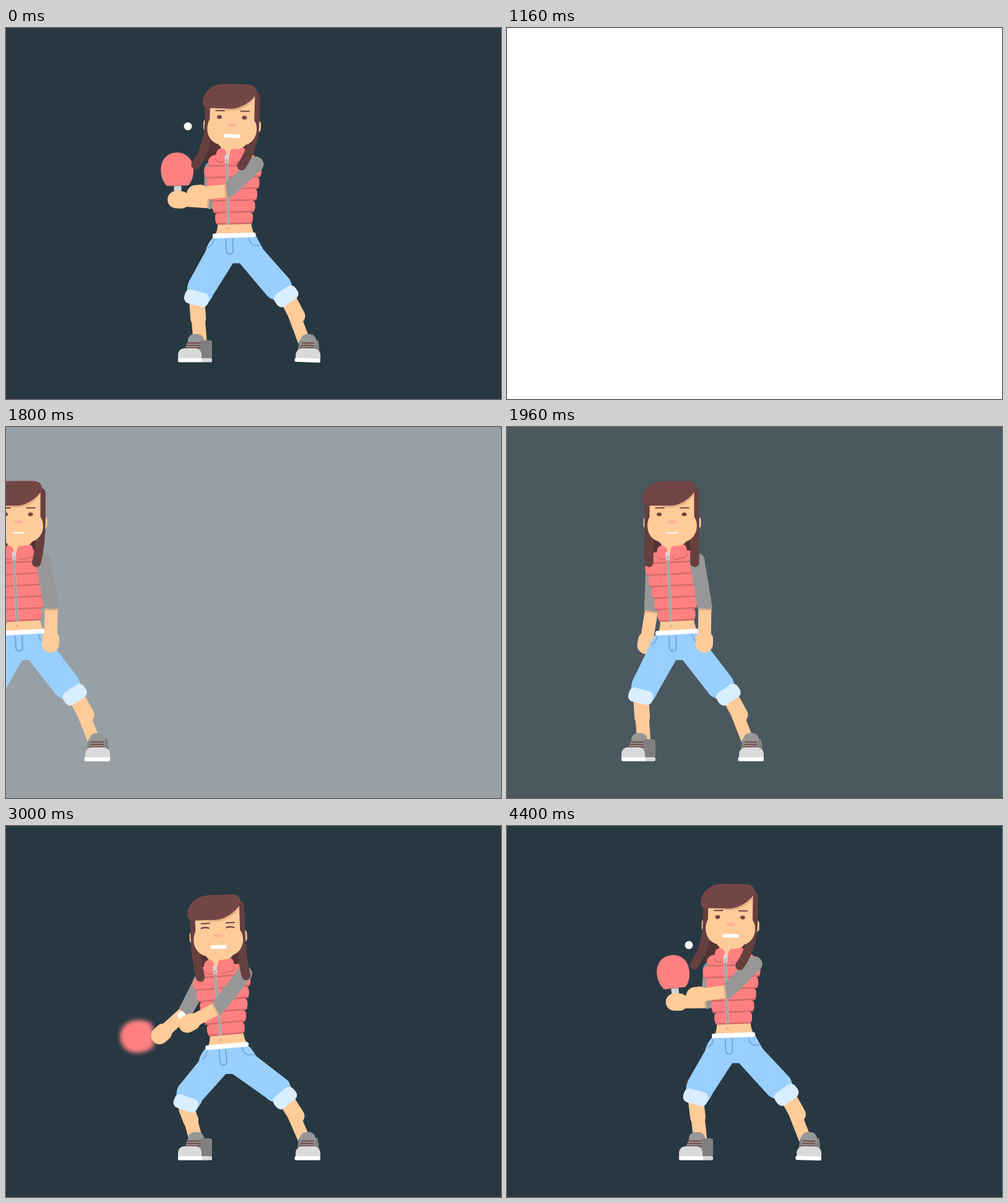
An HTML page with a canvas that plays this animation: 800x600 px, repeating every 4.44 s.

```html
<!DOCTYPE html>
<html>
<head>
<meta charset="utf-8">
<style>
html, body { margin: 0; width: 100%; height: 100%; overflow: hidden; background: #283842; }
canvas { display: block; }
</style>
</head>
<body>
<canvas id="stage" width="800" height="600"></canvas>
<script>
const ctx = document.getElementById('stage').getContext('2d');
// The loop is told from the white screen on: walk in, crouch, toss, strike, white.
const LOOP = 4440, START = 1600, WHITE = 5600, HIT = 4800, RELEASE = 4335;
const SKIN = '#ffcb99', SKIN_DARK = '#e6b286', CORAL = '#ff8080', SEAM = '#d66b6d';
const HAIR = '#734646', STRAND = '#663f3f', BACK_HAIR = '#553333';
const GREY = '#979797', DARK_GREY = '#808080', LIGHT = '#dadada', BLUE_LINE = '#74aedf';

// waist x, y, tilt; racket arm: elbow, hand, racket angle; ball arm: elbow, hand
const STAND = [368, 332, -3, 327, 294, 318, 350, -180, 413, 290, 412, 348];
const CROUCH = [350, 356, -5, 291, 300, 247, 326, -32, 343, 294, 292, 312];
const TOSS = [373, 331, -.7, 341, 277, 285, 267, 5, 364, 256, 313, 258];
const FOLLOW = [386, 346, 2, 397, 285, 456, 269, 82, 433, 285, 426, 338];

const clamp = v => Math.max(0, Math.min(1, v));
const mix = (a, b, k) => a + (b - a) * k;
const ramp = (t, from, to) => clamp((t - from) / (to - from));
const ease = (t, from, to) => {
  const u = ramp(t, from, to);
  return u * u * (3 - 2 * u);
};
const bump = (t, mid, half) => clamp(1 - Math.abs(t - mid) / half);

function poseAt(t) {
  const crouch = ease(t, 2480, 2960);
  let p = STAND;
  for (const [next, k] of [[CROUCH, crouch], [TOSS, ease(t, 4120, 4560)], [FOLLOW, ease(t, 4760, 5000)]])
    p = p.map((v, i) => mix(v, next[i], k));
  let [x, y, tilt, ex, ey, hx, hy, angle, bex, bey, bhx, bhy] = p;

  // The weight shifts sideways later than the knees bend.
  const lag = 18 * (crouch - ease(t, 2480, 3400));
  // Two dips of the racket while she bounces on her knees.
  const dip = Math.sin(Math.PI * 2 * ramp(t, 2694, 3918)) ** 2;
  const bob = Math.sin(Math.PI * 2 * ramp(t, 3000, 3920));
  return {
    x: x + lag, y: y - 5 * bob, tilt,
    racketArm: [ex, ey, hx + lag / 2, hy + 11 * dip],
    ballArm: [bex, bey, bhx + lag / 2, bhy + 7 * dip],
    angle: angle - 63 * dip
  };
}

function at(x, y, deg, draw) {
  ctx.save();
  ctx.translate(x, y);
  ctx.rotate(deg * Math.PI / 180);
  draw();
  ctx.restore();
}
function fill(color, d) {
  ctx.fillStyle = color;
  ctx.fill(new Path2D(d));
}
function line(color, width, d, cap = 'round') {
  ctx.strokeStyle = color;
  ctx.lineWidth = width;
  ctx.lineCap = cap;
  ctx.lineJoin = 'round';
  ctx.stroke(new Path2D(d));
}
function box(color, x, y, w, h, r = 0) {
  ctx.fillStyle = color;
  ctx.beginPath();
  ctx.roundRect(x, y, w, h, r);
  ctx.fill();
}
function oval(color, x, y, rx, ry = rx) {
  ctx.fillStyle = color;
  ctx.beginPath();
  ctx.ellipse(x, y, rx, ry, 0, 0, 7);
  ctx.fill();
}

const weave = document.createElement('canvas');
weave.width = 4;
weave.height = 1;
const thread = weave.getContext('2d');
thread.fillStyle = '#9bd1ff';
thread.fillRect(0, 0, 4, 1);
thread.fillStyle = '#95cbfa';
thread.fillRect(0, 0, 1, 1);
const denim = ctx.createPattern(weave, 'repeat');

function laces(x, w) {
  for (let y = 509.5; y < 518; y += 4) line(HAIR, 2, `M${x - (y - 509) / 4} ${y}H${x + w}`);
}

function shoes(tilt) {
  box(GREY, 294, 495, 26, 28, 10);
  box(DARK_GREY, 314, 505, 19, 30, 4);
  fill(GREY, 'M293 508H315V522H288Z');
  laces(293, 21);
  box(LIGHT, 278, 518, 38, 18, [10, 10, 0, 0]);
  box('#fff', 278, 534, 39, 6.5, [2, 0, 0, 2]);
  box(LIGHT, 317, 534, 16, 6.5, [0, 2, 2, 0]);
  at(487, 537, tilt, () => {
    ctx.translate(-487, -537);
    fill(DARK_GREY, 'M475 504H502Q505 504 506 525H471Q472 504 475 504Z');
    box(GREY, 475, 495, 25, 26, 10);
    laces(478, 19);
    box(LIGHT, 468, 518, 40, 18, [11, 11, 0, 0]);
    box('#fff', 466.5, 534, 41.5, 6.5, 2);
  });
}

function legs(t, x, y, tilt) {
  // The feet stay put, so the knees follow the waist in part.
  const dx = x - STAND[0], dy = y - STAND[1];
  const lx = 309 + .67 * dx - .47 * dy, ly = 436 - .2 * dx + .46 * dy;
  const rx = 451 + .77 * dx + .345 * dy, ry = 433 - .1 * dx + .25 * dy;
  const L = (a, b) => `${lx + a} ${ly + b} `, R = (a, b) => `${rx + a} ${ry + b} `;
  const W = (a, b) => `${x + a} ${y + b} `;

  const ankle = 314 + .4 * (lx - 309);
  line(SKIN, 25, `M${L(1, 8)}L${mix(lx, ankle, .5)} ${mix(ly, 502, .5)}`);
  line(SKIN, 22, `M${mix(lx, ankle, .4)} ${mix(ly, 502, .4)}L${ankle} 506`);
  line(SKIN, 26, `M${R(5, 8)}L${mix(rx, 482, .5) + 3} ${mix(ry, 502, .47)}`);
  line(SKIN, 20, `M${mix(rx, 482, .45)} ${mix(ry, 502, .45)}L481 505`);
  shoes(2 * ramp(t, 4300, 4440));

  const hip = 25 + 1.8 * tilt;
  fill(denim,
    `M${W(-34, 3)}Q${W(-43, 12)}${W(-46, 25)}L${L(-12, -28)}Q${L(-16, -20)}${L(-15, -8)}` +
    `L${L(18, 8)}Q${L(23, 3)}${L(27, -6)}L${W(-2, 45)}${W(9, 45)}L${R(-31, -1)}` +
    `Q${R(-25, 6)}${R(-14, 7)}L${R(10, -10)}Q${R(10, -20)}${R(5, -28)}L${W(47, hip)}Q${W(40, hip - 12)}${W(35, 0)}Z`);
  at(lx, ly, 14 + dy * .25, () => box('#d9eeff', -20, -12, 40, 23, 9));
  at(rx, ry, -34 - dy * .25, () => box('#d9eeff', -20, -12, 40, 24, 9));
}

function torso() {
  line(BLUE_LINE, 2.5, 'M-13.500 5V23Q-13.500 30 -8 30Q-2.500 30 -2.500 23V5', 'butt');
  line(BLUE_LINE, 2, 'M-43 18Q-34 15 -33 5M24 4Q25 16 34 17H43', 'butt');
  fill(SKIN, 'M-26 -20H28Q29 -8 33 0H-31Q-27 -8 -26 -20Z');
  oval(SKIN_DARK, -9.5, -11, 2.5, 2);
  box('#fff', -35, -4, 70, 7.5, 3);
  box(SKIN, -18, -152, 24, 36);
  box(SKIN_DARK, -18, -152, 24, 14);
  for (let i = 0; i < 6; i++) {
    const y = -131 + 18.8 * i, half = i ? 50 - 4 * i : 39, top = i ? 5 : 14;
    box(SEAM, -half + 1, y + 5, 2 * half - 1, 14, 4);
    box(CORAL, -half, y, 2 * half + 1, 16.3, [top, top, 5, 5]);
  }
  fill(SKIN, 'M-15 -141H-1L-8 -118Z');
  for (const [x, w, turn] of [[-18, 16, 12], [10, 26, -12]]) {
    at(x, -130, turn, () => {
      box(SEAM, -w / 2, -9, w, 21, 7);
      box(CORAL, -w / 2, -11, w, 21, 7);
    });
  }
  line('#b3b3b3', 4.5, 'M-9 -125V-18', 'butt');
  line('#8d8d8d', 1, 'M-9 -125V-18', 'butt');
  box('#d4d4d4', -12, -131, 6.5, 13, 3);
  oval('#a5a5a5', -8.8, -122, 1.5, 2);
}

function arm([sx, sy], [ex, ey, hx, hy]) {
  const len = Math.hypot(hx - ex, hy - ey), ux = (hx - ex) / len, uy = (hy - ey) / len;
  const cx = ex + ux * 4, cy = ey + uy * 4;
  line(SKIN, 21, `M${ex} ${ey}L${hx} ${hy}`);
  at(hx, hy, Math.atan2(uy, ux) * 180 / Math.PI, () => box(SKIN, -19, -14, 36, 28, 14));
  line(SKIN_DARK, 21, `M${cx} ${cy}L${cx + ux * 3} ${cy + uy * 3}`, 'butt');
  oval(GREY, sx, sy, 12.5);
  line(GREY, 24, `M${sx} ${sy}Q${ex} ${ey} ${cx} ${cy}`, 'butt');
}

function racket(t, x, y, angle) {
  const whirl = Math.max(bump(t, 3000, 160), bump(t, 4890, 120));
  const size = ramp(t, 2520, 2640);
  at(x, y, angle, () => {
    if (whirl) ctx.filter = `blur(${3 * whirl}px)`;
    ctx.scale(size, size);
    ctx.translate(0, 10 * whirl);
    box('#cfd4d8', -6, -28, 12, 24);
    const blade = 'M-17 -23C-23 -29 -26 -38 -26 -48C-26 -66 -14 -76 0 -76S26 -66 26 -48C26 -38 23 -29 17 -23Z';
    line('#806068', 1.5, blade);
    fill(CORAL, blade);
  });
}

function head(sway, happy, smile) {
  for (const x of [-41, 42]) box(SKIN, x - 5, 4, 10, 19, 5);
  for (const [x, top] of [[-37, -14], [37, -35]])
    line(STRAND, 14.5, `M${x} ${top}V10Q${x} 48 ${x + sway} 78`);
  fill(SKIN, 'M-36 -36V4C-42 14 -42 38 -21 44Q-17 51 -4 51H6Q19 51 23 44C42 38 44 14 36 4V-38Z');
  fill(SKIN_DARK, 'M-6 -16L36 -38L36 -32Q24 -14 2 -11H-20Z');
  fill(HAIR, 'M-48 -21C-50 -38 -34 -54 -12 -54H26Q39 -53 39 -39Q28 -24 14 -18Q6 -14 -2 -14H-38Q-46 -14 -48 -21Z');

  const brow = happy ? -8.5 : -10.5;
  line(HAIR, 2, `M-27 ${brow}h15M13 ${brow}h15`, 'butt');
  for (const x of [-20.5, 20]) {
    if (happy) line(HAIR, 2.5, `M${x - 6.5} 0Q${x - 5} -2 ${x} -2T${x + 6.5} 0`, 'butt');
    else oval(HAIR, x, 0, 4, 3);
  }
  box('#ffb196', -6, 10, 13, 4.5, 2);
  const w = mix(9, 13, smile), h = mix(1, 3, smile);
  box('#fff', .5 - w, 30 - h, 2 * w, 2 * h, h * .6);
}

function ballAt(t, hand) {
  if (t < RELEASE) return [hand[2] - 12, hand[3] - 13, 6.5];
  if (t < HIT) {
    const s = t - LOOP;
    return [294, 159 - .75 * s + .00225 * s * s, 6.5];
  }
  // Struck straight at the viewer: the size grows with 1 / distance.
  const u = (t - HIT) / 760;
  return [mix(294, 388, u), mix(180, 320, u * u), 1 / mix(1 / 6.5, 1 / 143, u)];
}

function girl(t) {
  const { x, y, tilt, racketArm, ballArm, angle } = poseAt(t);
  const rad = tilt * Math.PI / 180, cos = Math.cos(rad), sin = Math.sin(rad);
  const point = (a, b) => [x + a * cos - b * sin, y + a * sin + b * cos];
  const [hx, hy] = point(1.5, -191);
  // Hair trails behind the body and swings out after she arrives.
  const since = t - START;
  const sway = 2.2 * (poseAt(t - 120).x - x) - 16 * Math.cos(since / 230) * Math.exp(-since / 600);
  const happy = t > 2680 && t < 4080;
  const ball = ballAt(t, ballArm);
  const racketSide = () => {
    racket(t, racketArm[2], racketArm[3], angle);
    arm(point(-33, -108), racketArm);
  };

  at(hx, hy, tilt + 3, () => fill(BACK_HAIR, `M-32 20H34L${33 + sway * .6} 72H${-30 + sway * .6}Z`));
  if (t < HIT) racketSide();
  legs(t, x, y, tilt);
  at(x, y, tilt, torso);
  if (t > 2700 && t < HIT) oval('#fff', ...ball);
  arm(point(38, -114), ballArm);
  at(hx, hy, tilt + 3, () => head(sway, happy, ramp(t, 2560, 2720)));
  if (t >= HIT) {
    racketSide();
    oval('#fff', ...ball);
  }
}

function frame() {
  const now = Math.floor(performance.now() % LOOP / 40) * 40;
  const t = now < START ? now + LOOP : now;
  const dark = t < WHITE ? ramp(t, 1590, 2030) : 0;
  ctx.fillStyle = `rgb(${mix(255, 40, dark)}, ${mix(255, 56, dark)}, ${mix(255, 66, dark)})`;
  ctx.fillRect(0, 0, 800, 600);
  if (t < WHITE) at(-810 * (1 - ramp(t, 1600, 2100)) ** 1.7, 0, 0, () => girl(t));
  requestAnimationFrame(frame);
}
frame();
</script>
</body>
</html>
```
